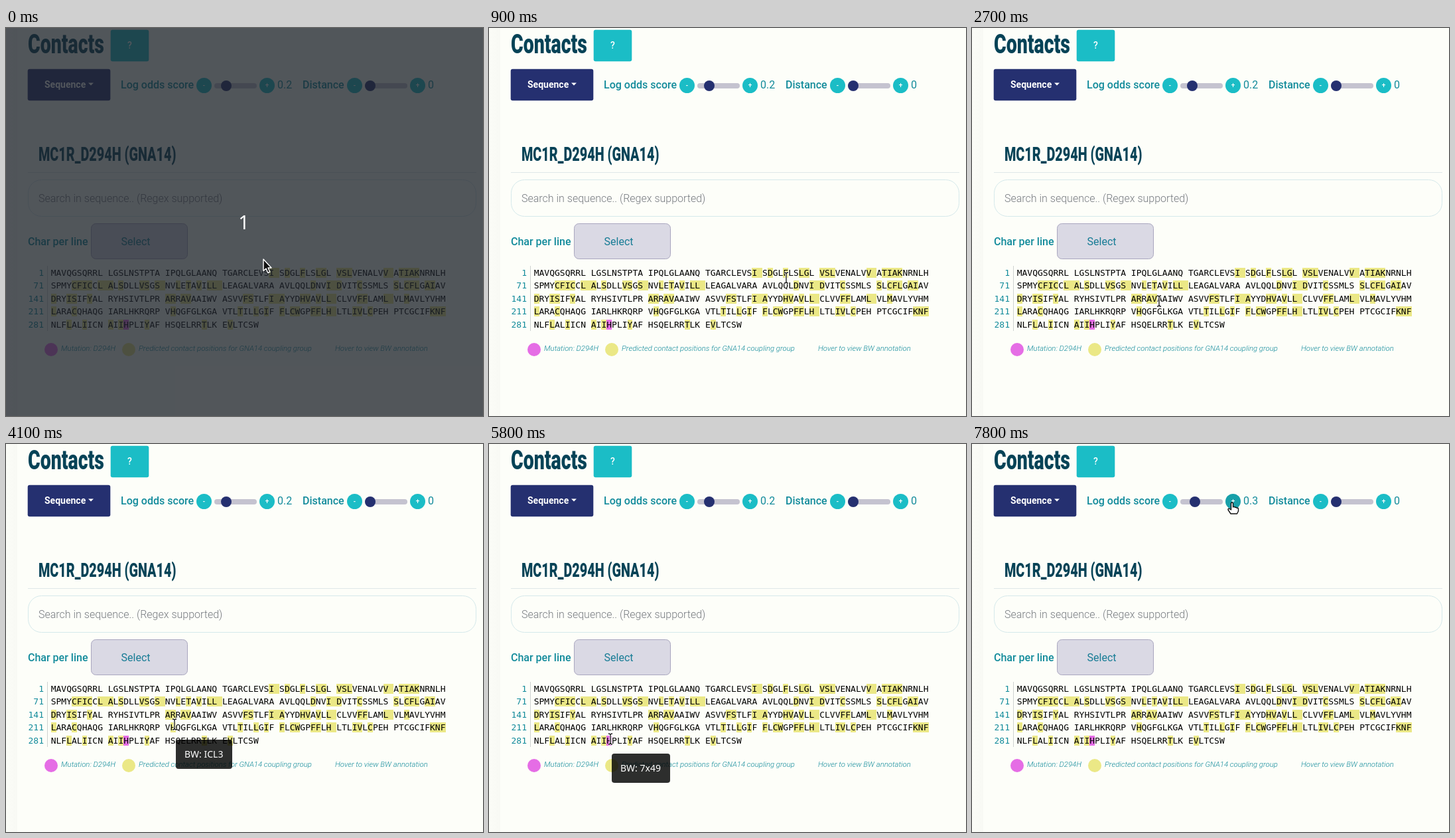
Write an HTML page that moves like this. It is 719 by 584 pixels and loops after 8 s.

```html
<!DOCTYPE html>
<html lang="en">
<head>
<meta charset="utf-8">
<title>Contacts</title>
<style>
  html, body { margin: 0; width: 100%; height: 100%; overflow: hidden; background: #fdfef9; }
  svg { display: block; width: 719px; height: 584px; font: 16px Roboto, sans-serif; fill: #128b9b; }
  text { white-space: pre; }
  .title { font-weight: 800; fill: #064357; }
  .medium { font-weight: 500; }
  .white { fill: #fff; font-weight: 500; }
  .middle { text-anchor: middle; }
  .teal { fill: #1bbdc6; }
  .navy { fill: #253070; }
  .track { fill: #c5c3d0; }
  .mark { fill: #ebe886; }
  .mutation { fill: #e56de5; }
  .sequence { font: 13px "DejaVu Sans Mono", monospace; }
  .sequence rect { shape-rendering: crispEdges; }
  .residues { fill: #000; }
  .number { text-anchor: end; }
  .legend { font-size: 11.4px; font-style: italic; font-weight: 300; }
  .tip { font: 14px "Noto Sans", "Open Sans", sans-serif; }
  .pointer path { stroke-linejoin: round; }
</style>
</head>
<body>
<svg viewBox="0 0 719 584">
  <defs>
    <linearGradient id="shade">
      <stop offset="0" stop-color="#fbfcf7"/>
      <stop offset="1" stop-color="#f8f9f4"/>
    </linearGradient>
  </defs>
  <rect width="719" height="584" fill="#fdfef9"/>
  <rect width="17" height="584" fill="url(#shade)"/>

  <text class="title" font-size="41" transform="translate(33 38) scale(.695 1)">Contacts</text>
  <rect class="teal" x="157.7" y="2.7" width="57.6" height="47.6" rx="3"/>
  <text class="white middle" x="186.5" y="31" font-size="14">?</text>
  <rect class="navy" x="32.7" y="61.7" width="124.6" height="47.6" rx="3"/>
  <text class="white" x="58" y="90" font-size="14" style="font-weight:700">Sequence</text>
  <path d="M124 82.5h8l-4 4z" fill="#fff"/>

  <text class="medium" x="173" y="91">Log odds score</text>
  <rect class="track" x="314" y="83" width="64" height="8" rx="4"/>
  <circle id="thumb" class="navy" cx="332" cy="87" r="8"/>
  <text id="score" x="409" y="91">0.2</text>
  <text class="medium" x="447" y="91">Distance</text>
  <rect class="track" x="541" y="83" width="64" height="8" rx="4"/>
  <circle class="navy" cx="549" cy="87" r="8"/>
  <text x="636" y="91">0</text>
  <g id="steppers"></g>

  <text class="title" font-size="30" transform="translate(49 200) scale(.66 1)">MC1R_D294H (GNA14)</text>
  <path d="M33 217.5H709" stroke="#dfe8e8"/>
  <rect x="33.5" y="228.5" width="675" height="55" rx="20" fill="none" stroke="#d5e9eb"/>
  <text x="49" y="262" fill="#777b80" font-weight="300">Search in sequence.. (Regex supported)</text>
  <text class="medium" x="33" y="327">Char per line</text>
  <rect x="128.5" y="294.5" width="145" height="53" rx="7" fill="#dad9e4" stroke="#a9a6bf"/>
  <text class="middle" x="195.5" y="327" fill="#177c95">Select</text>

  <g id="sequence" class="sequence"></g>
  <path d="M62.5 358V456" stroke="#cfd2d0"/>

  <g class="legend">
    <circle class="mutation" cx="68" cy="484" r="10"/>
    <text x="83" y="486">Mutation: D294H</text>
    <circle class="mark" cx="185" cy="484" r="10"/>
    <text x="200" y="486">Predicted contact positions for GNA14 coupling group</text>
    <text x="496" y="486">Hover to view BW annotation</text>
  </g>

  <g id="tip" class="tip">
    <rect width="88" height="44" rx="4" fill="#000" fill-opacity=".82"/>
    <text x="13" y="27" fill="#fff"></text>
  </g>
  <g id="countdown">
    <rect width="719" height="584" fill="#1f242b" fill-opacity=".77"/>
    <text class="tip middle" x="358.5" y="303" fill="#fff" style="font-size:29px">1</text>
  </g>
  <g id="pointer" class="pointer">
    <path id="arrow" d="M0 0V17.5L4 14L6.8 20.5L9.8 19.2L7 13H12Z" fill="#111" stroke="#fff" stroke-width="1.4"/>
    <g id="ibeam" fill="none">
      <path d="M-3-8Q0-8 0-6V6Q0 8-3 8M3-8Q0-8 0-6M0 6Q0 8 3 8" stroke="#fff" stroke-width="3"/>
      <path d="M-3-8Q0-8 0-6V6Q0 8-3 8M3-8Q0-8 0-6M0 6Q0 8 3 8" stroke="#111" stroke-width="1.3"/>
    </g>
    <path id="hand" d="M-1.5 0Q0-2 1.5 0V6Q3 4.5 4.5 6.5Q6 5.5 7.5 7.5Q9.5 6.5 9.5 9V12L7.5 16H-2L-6 10Q-6 7-3 9L-1.5 10Z" fill="#fff" stroke="#111" stroke-width="1.4"/>
  </g>
</svg>
<script>
const $ = id => document.getElementById(id);

function add(parent, tag, attrs, text = "") {
  const node = document.createElementNS("http://www.w3.org/2000/svg", tag);
  for (const key in attrs) node.setAttribute(key, attrs[key]);
  node.textContent = text;
  parent.append(node);
  return node;
}

// Square brackets wrap contact positions, angle brackets the mutation.
const rows = [
  "MAVQGSQRRL LGSLNSTPTA IPQLGLAANQ TGARCLEVS[I ]S[D]GL[F]LS[LG]L [VSL]VENALV[V ]A[TIAK]NRNLH",
  "SPMY[CFIC]C[L A]L[S]DLL[VS]G[S ]NV[L]E[T]A[V]I[LL ]LEAGALVARA AVLQQL[D]NV[I D]VIT[C]SSMLS [S]L[CFL]G[AI]AV",
  "[D]RY[IS]IF[Y]AL RYHSIVTLPR [AR]R[AV]AAIWV ASVV[FS]TLF[I A]YYD[HV]A[V]L[L ]CLVV[FF]LAM[L ]VL[M]AVLYVHM",
  "[L]ARA[C]QHAQG IARLHKRQRP V[H]QGFGLKGA VTL[T]IL[L]G[I]F [F]L[CW]GP[FF]L[H ]LTL[IV]L[C]PEH PTCGCIF[KNF]",
  "NLF[L]AL[I]ICN [A]I[I]<H>PLI[Y]AF HSQELRR[T]LK E[V]LTCSW"
];
const charWidth = 7.827, rowHeight = 19.5;

rows.forEach((row, r) => {
  const baseline = 373 + Math.floor(r * rowHeight), group = $("sequence");
  let column = 0;
  for (const part of row.match(/\[.+?\]|<.+?>|[^\[<]+/g)) {
    const plain = part.replace(/[\[\]<>]/g, "");
    if (plain !== part) add(group, "rect", {
      class: part[0] === "<" ? "mutation" : "mark",
      x: 67.7 + column * charWidth, y: baseline - 12,
      width: plain.length * charWidth, height: 15
    });
    column += plain.length;
  }
  add(group, "text", { class: "number", x: 57, y: baseline }, r * 70 + 1);
  add(group, "text", { class: "residues", x: 67.7, y: baseline }, row.replace(/[\[\]<>]/g, ""));
});

const buttons = [[298.5, "-"], [393.5, "+"], [525.5, "-"], [620.5, "+"]].map(([x, sign]) => {
  const circle = add($("steppers"), "circle", { class: "teal", cx: x, cy: 86.5, r: 11.5 });
  add($("steppers"), "text", { class: "white middle", x, y: 90, "font-size": 10 }, sign);
  return circle;
});

// start, number of 100 ms steps, end x, end y
const moves = [
  [300, 2, 401, 324], [600, 4, 448, 376], [1000, 3, 403, 406],
  [2400, 4, 282, 411], [2800, 2, 260, 409], [3100, 1, 272, 411], [3200, 1, 254, 422],
  [4600, 5, 185, 445], [5500, 1, 183, 444],
  [6400, 5, 232, 274], [7000, 8, 392, 89]
];
// start, end, x, y, width, label
const tips = [
  [1700, 2400, 405, 428, 88, "BW: 4x61"],
  [4100, 4600, 256, 445, 85, "BW: ICL3"],
  [5800, 6400, 185, 466, 88, "BW: 7x49"]
];

function pointerAt(time) {
  let x = 388, y = 348;
  for (const [start, steps, endX, endY] of moves) {
    if (time < start) break;
    const k = Math.min(1, (Math.floor((time - start) / 100) + 1) / steps);
    x += (endX - x) * k;
    y += (endY - y) * k;
  }
  return [x, y];
}

function shapeAt(x, y) {
  const inside = (l, t, r, b) => x >= l && x <= r && y >= t && y <= b;
  if (inside(382, 75, 405, 98) || inside(128, 294, 274, 348)) return "hand";
  if (inside(33, 359, 665, 456) || inside(33, 229, 709, 284)) return "ibeam";
  return "arrow";
}

const show = (node, on) => { node.style.display = on ? "" : "none"; };

function draw() {
  const time = performance.now() % 8000;
  const [x, y] = pointerAt(time), shape = shapeAt(x, y);
  $("pointer").setAttribute("transform", `translate(${Math.round(x)} ${Math.round(y)})`);
  for (const id of ["arrow", "ibeam", "hand"]) show($(id), id === shape);

  const tip = tips.find(([start, end]) => time >= start && time < end);
  show($("tip"), tip);
  if (tip) {
    const [, , left, top, width, label] = tip;
    $("tip").setAttribute("transform", `translate(${left} ${top})`);
    $("tip").firstElementChild.setAttribute("width", width);
    $("tip").lastElementChild.textContent = label;
  }

  const clicked = time >= 7800;
  $("thumb").setAttribute("cx", clicked ? 336 : 332);
  $("score").textContent = clicked ? "0.3" : "0.2";
  buttons[1].style.fill = time >= 7000 && shape === "hand" ? "#17a0a9" : "";
  show($("countdown"), time < 100);
  requestAnimationFrame(draw);
}
draw();
</script>
</body>
</html>
```
